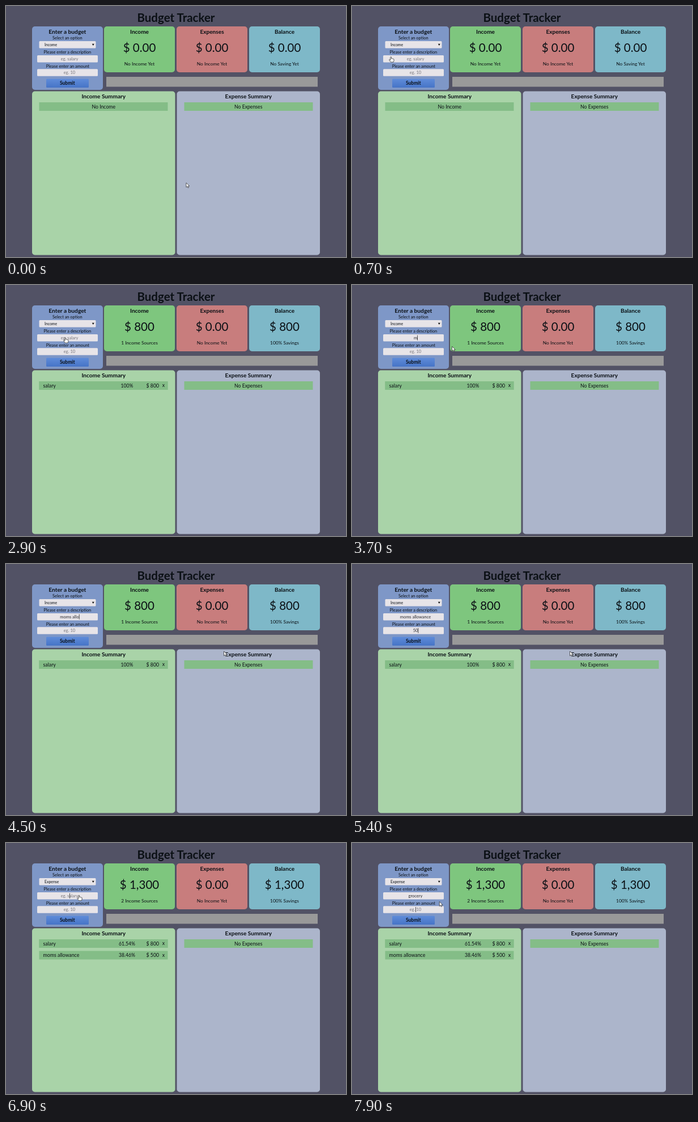
An HTML page that plays this animation: 600 by 443 pixels, repeating every 8000 ms.

```html
<!DOCTYPE html>
<html lang="en">
<head>
<meta charset="utf-8">
<title>Budget Tracker</title>
<style>
html, body { margin: 0; width: 100%; height: 100%; overflow: hidden; background: #525265; }
svg { display: block; width: 600px; height: 443px; }
text { font-family: Lato, "Open Sans", sans-serif; fill: #0b1015; }
</style>
</head>
<body>
<svg id="stage" viewBox="0 0 600 443" xmlns="http://www.w3.org/2000/svg">
  <defs>
    <linearGradient id="button" x2="0" y2="1">
      <stop stop-color="#5f8cd9"/><stop offset="1" stop-color="#4674c7"/>
    </linearGradient>
  </defs>
</svg>
<script>
const LOOP = 8000, STEP = 100;
const stage = document.getElementById('stage');

function add(tag, attrs, parent = stage) {
  const node = document.createElementNS('http://www.w3.org/2000/svg', tag);
  for (const key in attrs) node.setAttribute(key, attrs[key]);
  return parent.appendChild(node);
}
const box = (x, y, width, height, fill, rx = 0, parent) =>
  add('rect', { x, y, width, height, fill, rx }, parent);
function label(content, x, y, size, extra = {}, parent) {
  const node = add('text', { x, y, 'font-size': size, 'text-anchor': 'middle', ...extra }, parent);
  node.textContent = content;
  return node;
}
const bold = { 'font-weight': 700 };
const show = (node, on) => node.setAttribute('visibility', on ? 'visible' : 'hidden');
const setText = (node, value) => { if (node.textContent !== value) node.textContent = value; };

label('Budget Tracker', 300, 28.3, 20.5, bold);

// Entry form
box(46, 36, 125, 112, '#7e97c7', 5);
label('Enter a budget', 108.3, 48.6, 10.2, bold);
label('Select an option', 108.3, 59.3, 7.4);
label('Please enter a description', 108.3, 83.7, 7.4);
label('Please enter an amount', 108.8, 108.5, 7.4);
box(58.5, 62, 100, 12.5, '#e7e4e8', 1.5);
const option = label('Income', 68, 70.8, 6.9, { 'text-anchor': 'start' });
add('path', { d: 'M151.8 66.8h4l-2 3.2z', fill: '#111' });
box(71, 128.5, 75, 15.5, 'url(#button)', 1.5);
label('Submit', 108.3, 139.3, 8.5, bold);

function input(y, hint) {
  box(55, y, 107, 12.5, '#e7e4e8', 1.5);
  const text = label(hint, 112, y + 8.7, 7.5);
  const caret = box(112, y + 1.7, 0.7, 9, '#111');
  return { y, hint, text, caret };
}
const description = input(87, 'eg. salary');
const amount = input(111.3, 'eg. 10');

// Totals
function card(x, color, title) {
  box(x, 36, 125, 81, color, 5);
  label(title, x + 62.5, 48.6, 10.1, bold);
  return {
    total: label('', x + 62.5, 81, 20.5),
    note: label('', x + 62.5, 104.7, 8.35)
  };
}
const income = card(173, '#7ec67e', 'Income');
const expenses = card(301, '#c87d7d', 'Expenses');
const balance = card(429, '#7eb8c8', 'Balance');
setText(expenses.total, '$ 0.00');
setText(expenses.note, 'No Income Yet');
box(177, 125, 373, 17.5, '#999');

// Summaries
function summary(x, color, title) {
  box(x, 150.5, 252.5, 289, color, 5);
  label(title, x + 126.3, 162.8, 10.1, bold);
}
summary(46, '#a9d3a8', 'Income Summary');
summary(301.5, '#acb5cb', 'Expense Summary');
box(58.5, 170, 227, 15, '#84bd87');
box(314.5, 170, 227, 15, '#84bd87');
const noIncome = label('No Income', 172.3, 180.6, 8.7);
label('No Expenses', 427.7, 180.6, 8.7);

function row(y, name, value) {
  const group = add('g', {});
  box(58.5, y, 227, 15, '#84bd87', 0, group);
  label(name, 65.5, y + 10.6, 8.8, { 'text-anchor': 'start' }, group);
  const share = label('', 213.5, y + 10.6, 8.6, {}, group);
  label('$ ' + value, 270, y + 10.6, 8.7, { 'text-anchor': 'end' }, group);
  label('x', 278, y + 10.4, 8.7, {}, group);
  return { group, share, value };
}
const rows = [row(170, 'salary', 800), row(190.5, 'moms allowance', 500)];
const submits = [2800, 5800];

const arrow = add('path', {
  d: 'M0 0V8L1.9 6.3 3.1 9 4.5 8.4 3.3 5.8H5.8Z',
  fill: '#fff', stroke: '#222', 'stroke-width': 0.7, 'stroke-linejoin': 'round'
});
const hand = add('path', {
  d: 'M0 .9Q.9-.6 1.7.8V3.5Q2.6 2.9 3.2 3.8 4 3.2 4.7 4.1 6 3.7 6.2 5V7.3L5.2 9.7H.6L-2 6.4Q-2.6 5 -1.3 5L0 6.2Z',
  fill: '#f7f7f7', stroke: '#222', 'stroke-width': 0.7, 'stroke-linejoin': 'round'
});

// Keystrokes as [time, field, value]; a null field drops the focus.
const keys = [[0, null, '']];
function type(field, start, step, word, from = 0) {
  for (let n = from; n <= word.length; n++) {
    keys.push([start + (n - from) * step, field, word.slice(0, n)]);
  }
}
type(description, 820, 80, 'salaray');
keys.push([2000, description, 'salara'], [2100, description, 'salar'], [2200, description, 'salary']);
type(amount, 2300, 100, '800');
keys.push([submits[0], null, '']);
type(description, 3590, 95, 'moms allowance');
type(amount, 5200, 100, '500');
keys.push([submits[1], null, '']);
type(description, 6900, 80, 'grocery');
type(amount, 7700, 100, '');

// Pointer stops as [time, x, y].
const stops = [
  [0, 318, 312], [200, 318, 312], [700, 67.8, 89.3], [800, 70, 90], [1000, 103.8, 92.5],
  [3500, 103.8, 92.5], [4100, 384.5, 154], [5800, 384.5, 154], [6300, 138.8, 73],
  [6500, 126, 69], [6700, 126, 69], [6900, 128, 92], [7200, 128, 92],
  [7600, 154.3, 103.5], [LOOP, 154.3, 103.5]
];
function pointerAt(t) {
  const i = stops.findIndex(stop => stop[0] > t);
  const [t0, x0, y0] = stops[i - 1], [t1, x1, y1] = stops[i];
  const p = (t - t0) / (t1 - t0), e = p * p * (3 - 2 * p);
  return [x0 + (x1 - x0) * e, y0 + (y1 - y0) * e];
}

const money = n => n ? '$ ' + n.toLocaleString('en-US') : '$ 0.00';

function drawField(field, value, focused, idle) {
  setText(field.text, value || field.hint);
  field.text.style.fill = value ? '#2b2b30' : '#77757a';
  const width = value ? field.text.getComputedTextLength() : 0;
  field.caret.setAttribute('x', 112.2 + width / 2);
  show(field.caret, focused && idle % 1000 < 500);
}

function draw(t) {
  const past = keys.filter(key => key[0] <= t);
  const [pressed, focus] = past[past.length - 1];
  const values = new Map();
  for (const [, field, value] of past) {
    if (field) values.set(field, value); else values.clear();
  }
  for (const field of [description, amount]) {
    drawField(field, values.get(field) || '', focus === field, t - pressed);
  }
  setText(option, t < 6800 ? 'Income' : 'Expense');

  const count = submits.filter(time => time <= t).length;
  const total = rows.slice(0, count).reduce((sum, item) => sum + item.value, 0);
  setText(income.total, money(total));
  setText(balance.total, money(total));
  setText(income.note, count ? count + ' Income Sources' : 'No Income Yet');
  setText(balance.note, count ? '100% Savings' : 'No Saving Yet');
  show(noIncome, !count);
  rows.forEach((item, i) => {
    show(item.group, i < count);
    if (i < count) setText(item.share, +(100 * item.value / total).toFixed(2) + '%');
  });

  const [x, y] = pointerAt(t);
  const overField = x > 55 && x < 162 &&
    [description, amount].some(field => y > field.y && y < field.y + 12.5);
  for (const cursor of [arrow, hand]) cursor.setAttribute('transform', `translate(${x} ${y})`);
  show(hand, overField);
  show(arrow, !overField);
}

const begin = performance.now();
function tick() {
  const t = (performance.now() - begin) % LOOP;
  draw(Math.floor(t / STEP) * STEP);
  requestAnimationFrame(tick);
}
tick();
</script>
</body>
</html>
```
